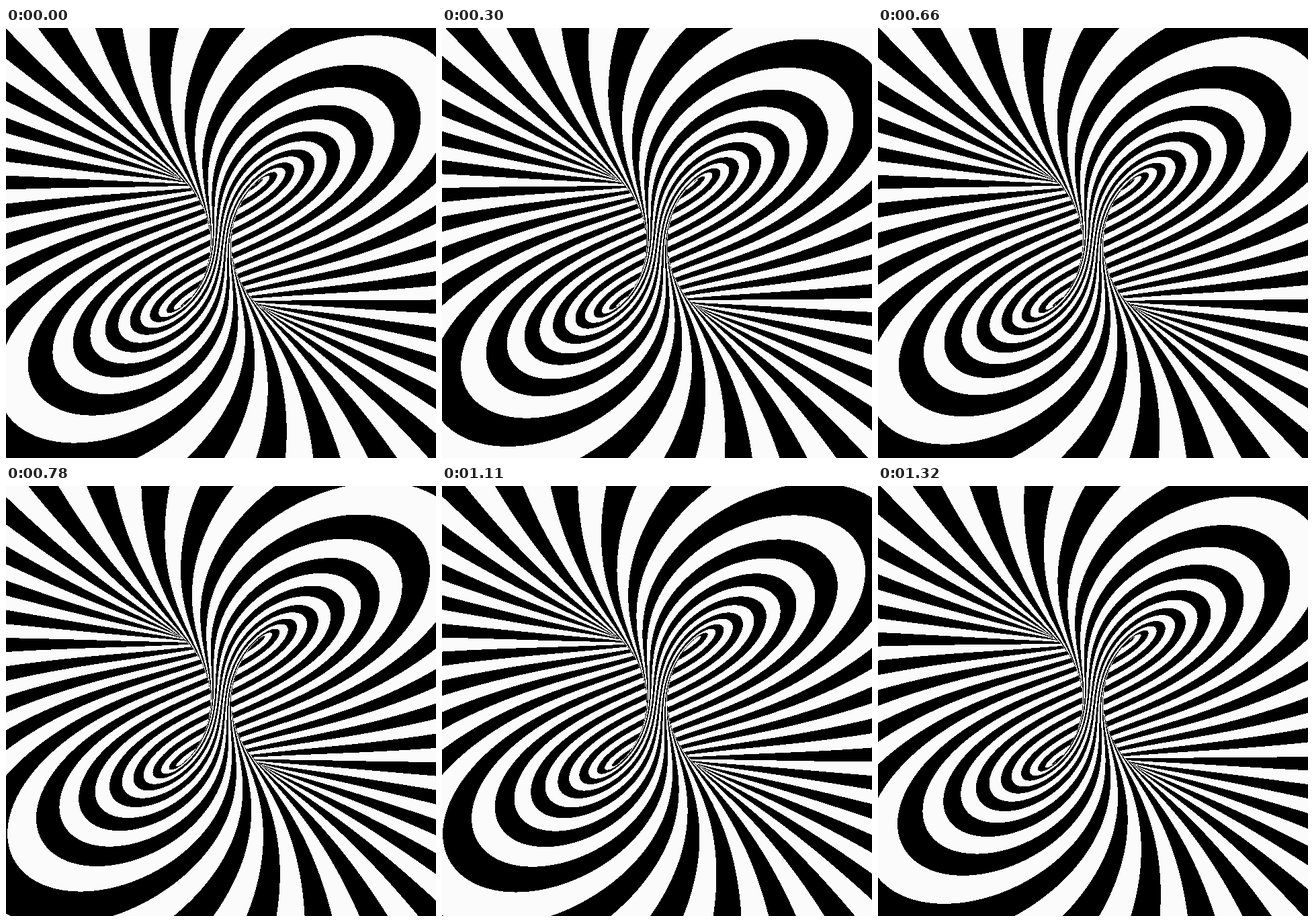
Write an HTML page with a canvas that moves like this. It is 640 px wide and 640 px high and loops after 1.35 s.

```html
<!DOCTYPE html>
<html>
<head>
<meta charset="utf-8">
<title>Striped torus</title>
<style>
  html, body { margin: 0; width: 100%; height: 100%; overflow: hidden; background: #000; }
  canvas { display: block; }
</style>
</head>
<body>
<canvas id="stage" width="640" height="640"></canvas>
<script>
const SIZE = 640;
const FOCAL = 216.7;    // focal length in pixels
const CAMERA = 1.5;     // camera distance from the axis, in ring radii
const TUBE = 0.89;      // tube radius, in ring radii
const STRIPES = 20;     // stripe pairs around either direction
const START = -69 / 360;
const PERIOD = 675, LOOP = 1350, STEP = 30;
const BLACK = 0xff000000, WHITE = 0xfffbfbfb;

const ctx = document.getElementById('stage').getContext('2d');
const image = ctx.createImageData(SIZE, SIZE);
const pixels = new Uint32Array(image.data.buffer);

// Casts a ray from inside the torus and returns the stripe phase, in turns, where it lands.
function stripePhase(u, v) {
  const length = Math.hypot(u, v, 1);
  const dx = u / length, dy = v / length, dz = -1 / length;
  let x = 0, y = 0, z = CAMERA, offset = 0;
  for (let i = 0; i < 120; i++) {
    offset = Math.sqrt(x * x + z * z) - 1;
    const gap = TUBE - Math.sqrt(offset * offset + y * y);
    if (gap < 1e-4) break;
    x += dx * gap;
    y += dy * gap;
    z += dz * gap;
  }
  const angle = Math.atan2(x, z) + Math.atan2(y, offset);
  return STRIPES * (angle / (2 * Math.PI) + 2) + START;
}

const phases = new Float32Array(SIZE * SIZE);
for (let row = 0, i = 0; row < SIZE; row++) {
  for (let col = 0; col < SIZE; col++, i++) {
    phases[i] = stripePhase((col + 0.5 - SIZE / 2) / FOCAL, (SIZE / 2 - row - 0.5) / FOCAL);
  }
}

function draw(time) {
  const shift = time / PERIOD;
  for (let i = 0; i < pixels.length; i++) {
    pixels[i] = (phases[i] + shift) % 1 < 0.5 ? BLACK : WHITE;
  }
  ctx.putImageData(image, 0, 0);
}

let shown = -1;
const began = performance.now();
function tick() {
  const time = Math.floor((performance.now() - began) % LOOP / STEP) * STEP;
  if (time !== shown) draw(shown = time);
  requestAnimationFrame(tick);
}
tick();
</script>
</body>
</html>
```
